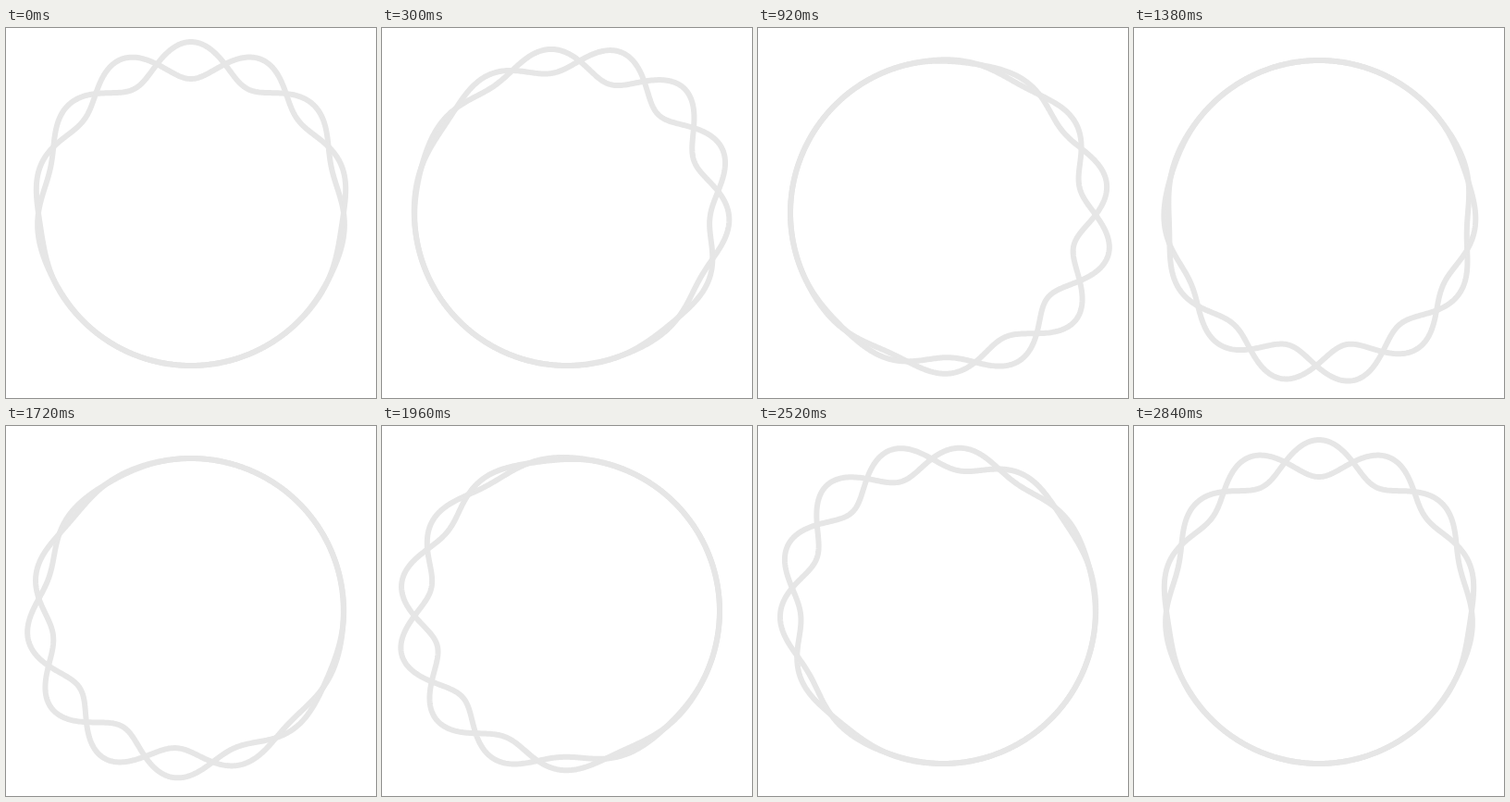
Animation of 400 by 400 pixels, one loop 2.86 s. Source, as an HTML page:

```html
<!DOCTYPE html>
<html lang="en">
<head>
<meta charset="utf-8">
<title>Braided ring</title>
<style>
  html, body { margin: 0; width: 100%; height: 100%; overflow: hidden; background: #fff; }
  svg { display: block; width: 100vw; height: 100vh; }
  path { fill: none; stroke: #e6e6e6; stroke-width: 6; stroke-linejoin: round; }
</style>
</head>
<body>
<svg viewBox="0 0 400 400">
  <path id="a"/>
  <path id="b"/>
</svg>
<script>
  const LOOP = 2860, TURN = 2840;   // the last pose rests until the loop restarts
  const CENTER = 200, RADIUS = 165, SWING = 20, WAVES = 7, FALLOFF = 2.6;
  const STEPS = 720, TAU = Math.PI * 2;
  const strands = [[document.getElementById('a'), 1], [document.getElementById('b'), -1]];

  // Angles run clockwise from the top; the swell turns once per loop
  // while the ripples drift the other way by three half waves.
  function ring(turn, sign) {
    const points = [];
    for (let i = 0; i < STEPS; i++) {
      const angle = i / STEPS * TAU;
      const swell = Math.pow((1 + Math.cos(angle - turn * TAU)) / 2, FALLOFF);
      const ripple = Math.cos(WAVES * angle + 3 * Math.PI * turn);
      const r = RADIUS + sign * SWING * swell * ripple;
      const x = CENTER + r * Math.sin(angle);
      const y = CENTER - r * Math.cos(angle);
      points.push(x.toFixed(2) + ' ' + y.toFixed(2));
    }
    return 'M' + points.join('L') + 'Z';
  }

  function draw(time) {
    const turn = Math.min(1, time % LOOP / TURN);
    for (const [path, sign] of strands) path.setAttribute('d', ring(turn, sign));
  }

  function tick(now) {
    draw(now);
    requestAnimationFrame(tick);
  }

  draw(0);
  requestAnimationFrame(tick);
</script>
</body>
</html>
```
